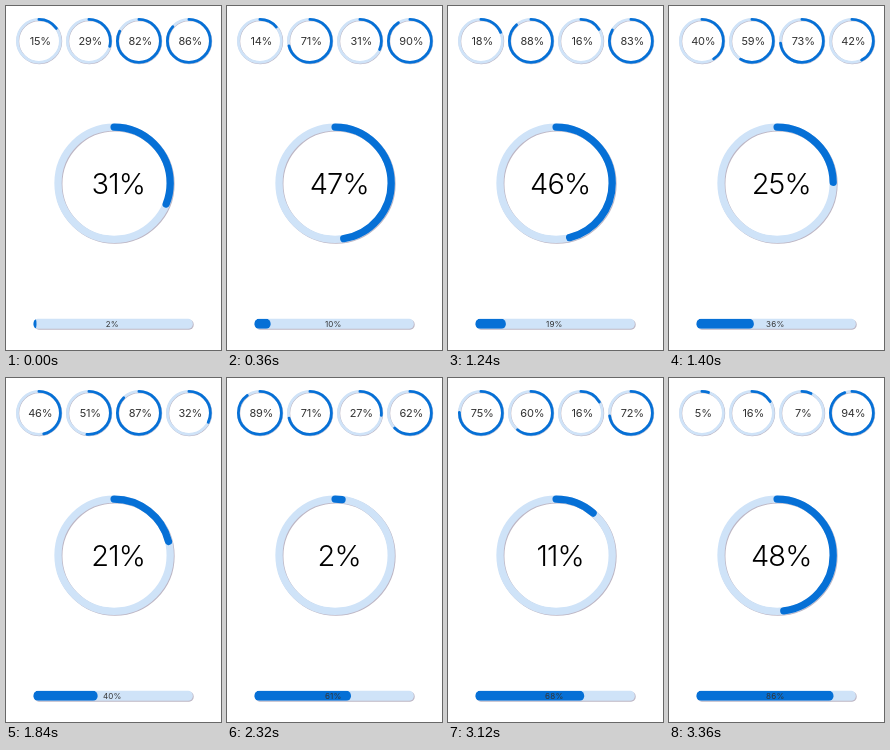
These frames come from a looping animation (215 px wide and 344 px high, 3520 ms). An HTML page:

```html
<!DOCTYPE html>
<html lang="en">
<head>
<meta charset="utf-8">
<title>Progress indicators</title>
<style>
  html, body { margin: 0; width: 100%; height: 100%; overflow: hidden; background: #fff; }
  svg { display: block; width: 215px; height: 344px; }
  circle { fill: none; }
  circle.shadow { stroke: #bdb6c4; }
  circle.track { stroke: #cfe3f8; }
  circle.arc { stroke: #0670d6; stroke-linecap: round; }
  rect.shadow { fill: #bdb6c4; }
  rect.track { fill: #cfe3f8; }
  rect.fill { fill: #0670d6; }
  text { font-family: Inter, Roboto, sans-serif; text-anchor: middle; fill: #333; }
  text.large { font-weight: 300; fill: #000; }
</style>
</head>
<body>
<svg viewBox="0 0 215 344"></svg>
<script>
const LOOP = 3520, STEP = 40;

// Values: four small rings, the large ring, the bar
const values = [
  [15, 29, 82, 86, 31, 2],
  [13, 95, 2, 93, 57, 15],
  [46, 51.2, 87, 32, 21, 40.3],
  [95, 73, 19, 66, 1, 63.2],
  [5, 16, 7, 94, 48, 86]
];

// Start, end, and time skew for the small parts and the large ring
const moves = [
  [40, 600, 1, 1],
  [940, 1480, 2.13, 1.6],
  [2000, 2520, .559, .354],
  [3000, 3360, 1, 1]
];

const svg = document.querySelector('svg');

function add(tag, attrs) {
  const el = document.createElementNS('http://www.w3.org/2000/svg', tag);
  for (const key in attrs) el.setAttribute(key, attrs[key]);
  svg.append(el);
  return el;
}

function label(x, y, size, spacing, name) {
  return add('text', { x, y, 'font-size': size, 'letter-spacing': spacing, class: name });
}

function addTrack(tag, shape, drop) {
  add(tag, { ...shape, class: 'shadow', transform: `translate(${drop} ${drop})` });
  add(tag, { ...shape, class: 'track' });
}

function ring(cx, cy, r, width, drop, text) {
  const shape = { cx, cy, r, 'stroke-width': width };
  addTrack('circle', shape, drop);
  const arc = add('circle', { ...shape, class: 'arc', transform: `rotate(-90 ${cx} ${cy})` });
  const length = 2 * Math.PI * r;
  return value => {
    arc.setAttribute('stroke-dasharray', `${length * value / 100} ${length}`);
    text.textContent = Math.round(value) + '%';
  };
}

function bar(x, y, width, height) {
  const shape = { x, y, width, height, rx: 4.6 };
  addTrack('rect', shape, .9);
  const clip = add('clipPath', { id: 'pill' });
  clip.append(add('rect', shape));
  const fill = add('rect', { ...shape, class: 'fill', 'clip-path': 'url(#pill)' });
  const text = label(106.3, 320.9, 8, .2, 'small');
  return value => {
    fill.setAttribute('width', width * value / 100);
    text.textContent = Math.round(value) + '%';
  };
}

const parts = [33, 83, 133, 183].map(x =>
  ring(x - .1, 34.9, 21.5, 2.8, .4, label(x + 1.3, 39.1, 11, -.2, 'small')));
parts.push(ring(108.1, 177.2, 56.1, 7.3, .8, label(112.2, 187.8, 29, -.9, 'large')));
parts.push(bar(27.3, 312.8, 159.5, 10));

const ease = u => u < .5 ? 2 * u * u : 1 - 2 * (1 - u) ** 2;

function valueAt(i, time) {
  let value = values[0][i];
  moves.forEach(([start, end, skew, largeSkew], m) => {
    if (time <= start) return;
    const t = Math.min(1, (time - start) / (end - start));
    const p = ease(t ** (i === 4 ? largeSkew : skew));
    value = values[m][i] + (values[m + 1][i] - values[m][i]) * p;
  });
  return value;
}

function draw() {
  const now = performance.now() % LOOP;
  const time = now - now % STEP;
  parts.forEach((show, i) => show(valueAt(i, time)));
  requestAnimationFrame(draw);
}
draw();
</script>
</body>
</html>
```
